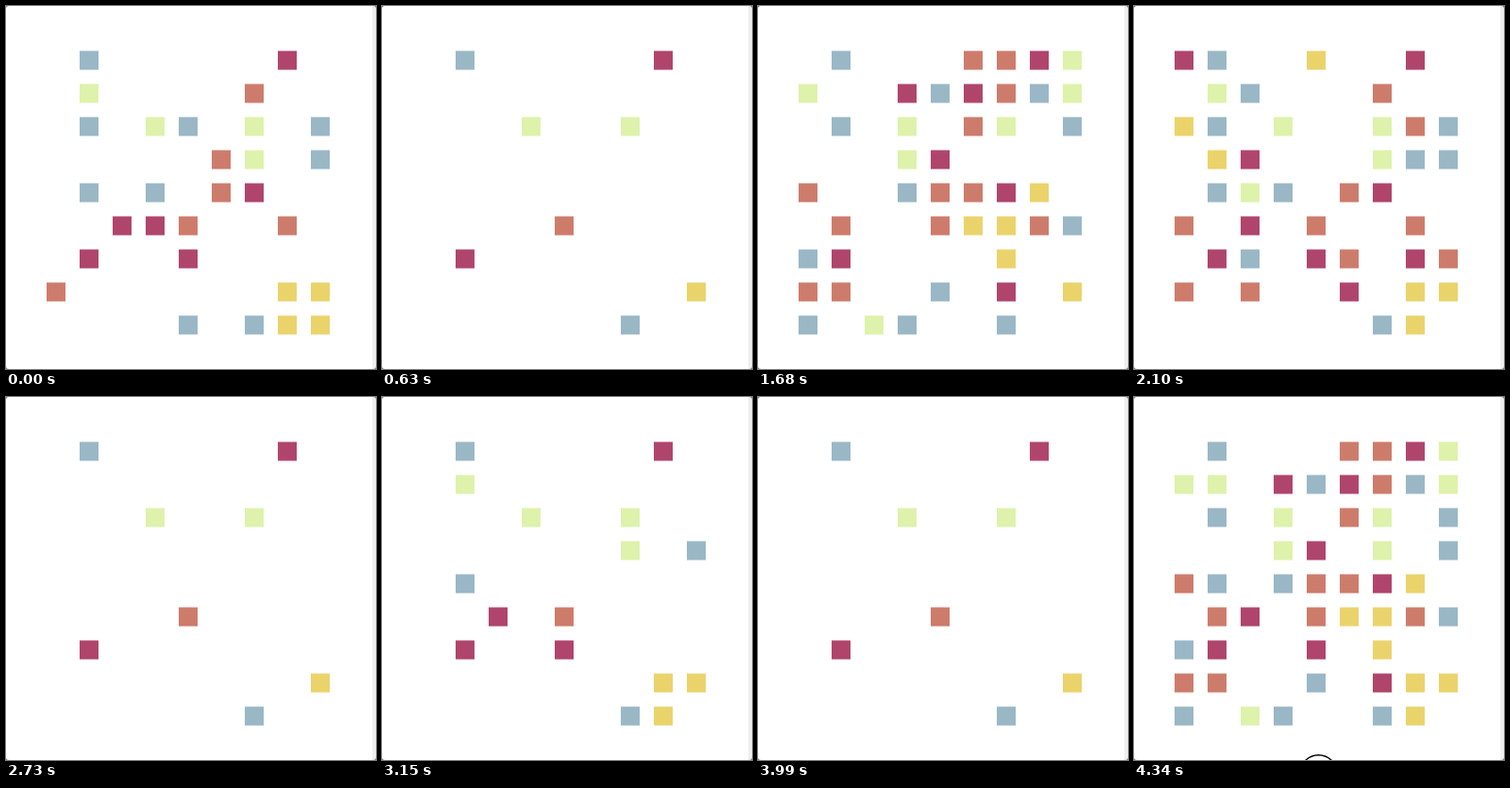
Animation, 392 px wide and 384 px high, one loop 4.41 s. Source, as an HTML page with a canvas:

```html
<!DOCTYPE html>
<html lang="en">
<head>
<meta charset="utf-8">
<title>Divisor grid</title>
<style>
  html, body { margin: 0; width: 100%; height: 100%; overflow: hidden; background: #777; }
  canvas { display: block; width: 392px; height: 384px; border-radius: 3px; }
</style>
</head>
<body>
<canvas id="stage" width="392" height="384"></canvas>
<script>
const LOOP = 4410, STEP = 210, FIRST = 1750, RING_AT = 4340;
const PITCH = 35, SIZE = 20, LEFT = 43, TOP = 47.5;

// A cell is lit whenever the counter is a multiple of its digit.
const divisors = [
  '819943316',
  '654663263',
  '829173142',
  '984667585',
  '658232269',
  '435713326',
  '618958684',
  '264934351',
  '396379157'
];
const tints = [
  'MBRBYRRMG',
  'GGBMBMRBG',
  'YBMGBRGRB',
  'RYMGMRGBB',
  'RBGBRRMYB',
  'RRMMRYYRB',
  'BMBGMRYMR',
  'RRRYBMMYY',
  'BRGBBMBYY'
];
const palette = { B: '#9ab7c6', M: '#b0456b', G: '#def2ab', R: '#cd7c6c', Y: '#ebd36c' };

const ctx = document.getElementById('stage').getContext('2d');

function drawRing() {
  ctx.beginPath();
  ctx.arc(195.5, 398.5, 19.75, 0, Math.PI * 2);
  ctx.lineWidth = 1.5;
  ctx.strokeStyle = '#000';
  ctx.stroke();
}

function draw(t) {
  const n = FIRST + Math.floor(t / STEP);
  ctx.fillStyle = '#fff';
  ctx.fillRect(0, 0, 392, 384);
  ctx.fillStyle = '#efefef';
  ctx.fillRect(388, 0, 4, 384);
  divisors.forEach((row, r) => {
    [...row].forEach((k, c) => {
      if (n % k) return;
      ctx.fillStyle = palette[tints[r][c]];
      ctx.fillRect(LEFT + c * PITCH, TOP + r * PITCH, SIZE, SIZE);
    });
  });
  if (t >= RING_AT) drawRing();
}

const start = performance.now();
function tick() {
  draw((performance.now() - start) % LOOP);
  requestAnimationFrame(tick);
}
tick();
</script>
</body>
</html>
```
